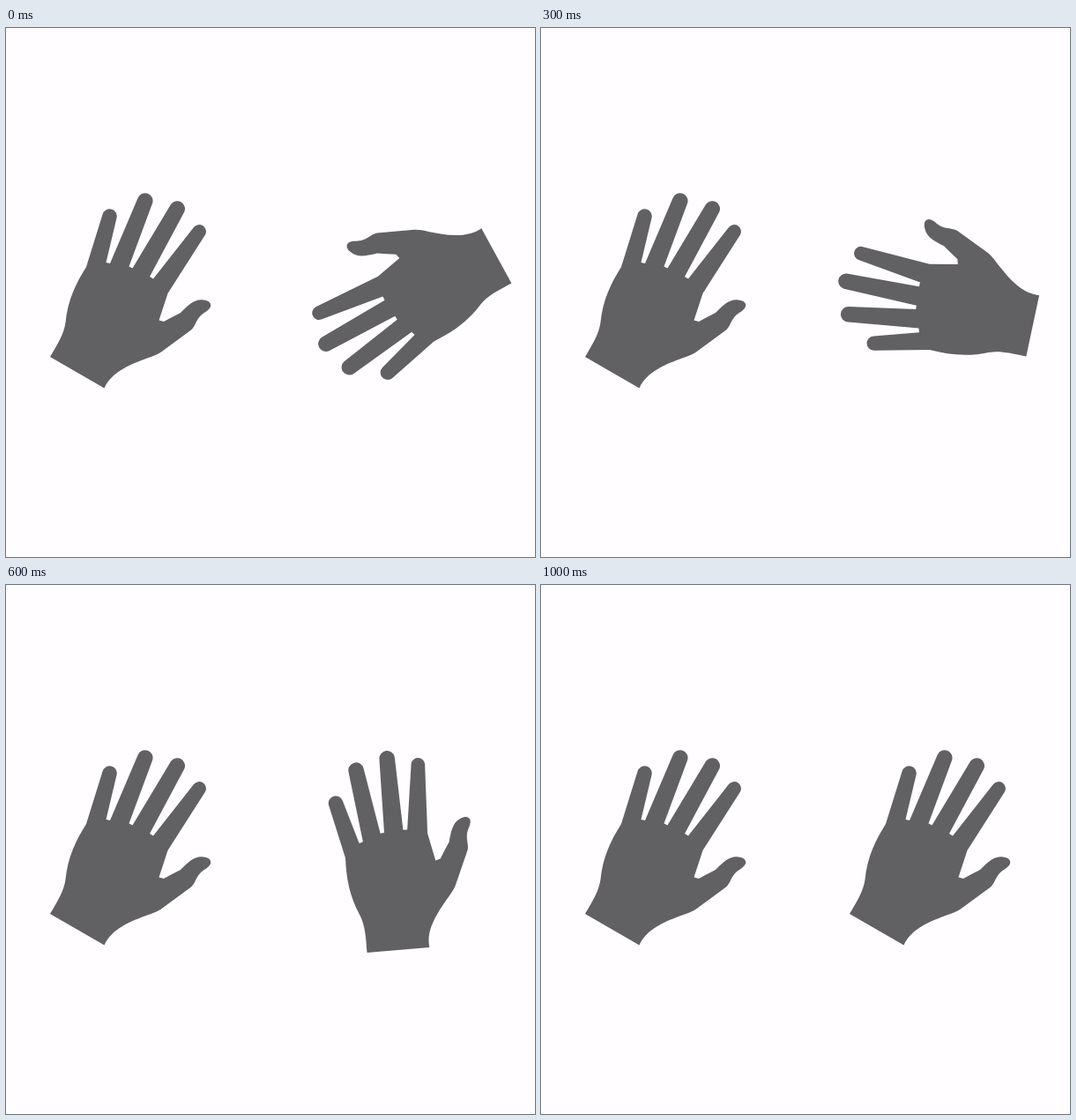
Animation, 600 px wide and 600 px high, one loop 1.5 s. Source, as an HTML page:

```html
<!DOCTYPE html>
<html lang="en">
<head>
<meta charset="utf-8">
<title>Turning hand</title>
<style>
  html, body { margin: 0; height: 100%; overflow: hidden; background: #fffdff; }
  svg { display: block; width: 100%; height: 100%; fill: #616063; }
</style>
</head>
<body>
<svg viewBox="0 0 600 600">
  <defs>
    <path id="hand" d="M50 373 L111.5 408.5
      C120 389 143 381 160 374.5 Q171 371 176 367.5 L210 342.5
      C215 338 215 332 221 326 C225 322 230 321 232 316 C233 312 230 309 224 308.5
      C214 307 207 314 198 323 Q188 328 179 333 L173.5 331.5 L183.5 301
      L226 234.5 A7.8 7.8 0 0 0 213 226 L167 284.5 L163 282
      L202.3 208.5 A8.8 8.8 0 0 0 187 200 L143.5 272.5 L139.5 270.5
      L166 199 A8.7 8.7 0 0 0 149.5 193 L118 267 L113.5 266
      L125.5 215.5 A8.2 8.2 0 0 0 109.5 211.5 L91 271
      C79 290 70 309 67.5 334 C66 346 59 358 50 373 Z"/>
  </defs>
  <use href="#hand"/>
  <use href="#hand" id="turning"/>
</svg>
<script>
  const LOOP = 1500, STEP = 100, TURN = 1000, LEAD = 200 / 3;
  const turning = document.getElementById('turning');

  // Same curve as CSS ease-in-out, solved by bisection
  function easeInOut(x) {
    let lo = 0, hi = 1;
    for (let i = 0; i < 30; i++) {
      const s = (lo + hi) / 2;
      if (1.26 * s - 0.78 * s * s + 0.52 * s ** 3 < x) lo = s;
      else hi = s;
    }
    return lo * lo * (3 - 2 * lo);
  }

  function draw(ms) {
    const held = Math.floor(ms % LOOP / STEP) * STEP;
    const angle = 150 * (easeInOut(Math.min(1, (held + LEAD) / TURN)) - 1);
    turning.setAttribute('transform', `translate(300 0) rotate(${angle.toFixed(3)} 150 300)`);
  }

  const start = performance.now();
  function tick() {
    draw(performance.now() - start);
    requestAnimationFrame(tick);
  }
  tick();
</script>
</body>
</html>
```
